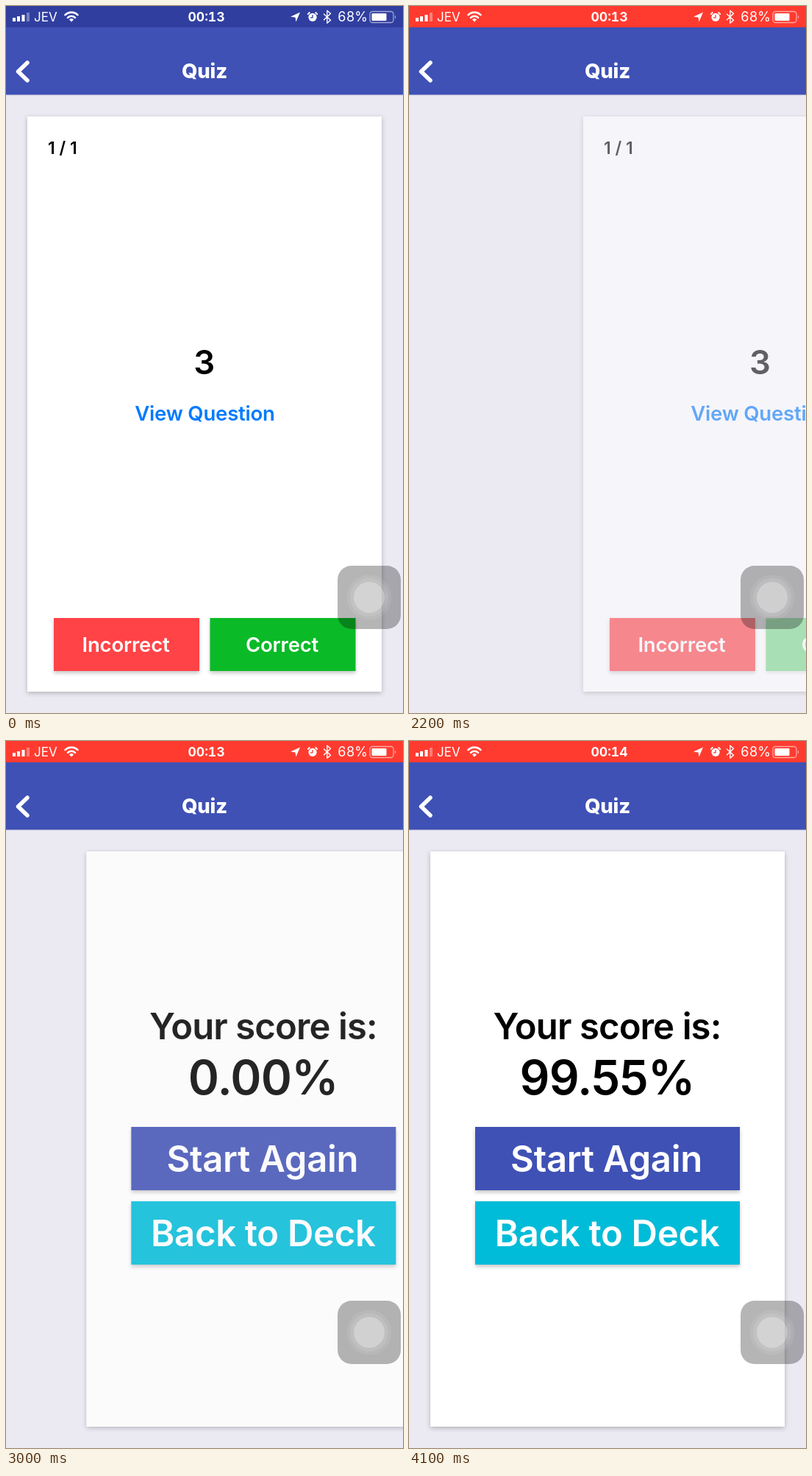
Animation, 540 px wide and 960 px high, one loop 4200 ms. Source, as an HTML page:

```html
<!DOCTYPE html>
<html lang="en">
<head>
<meta charset="utf-8">
<title>Quiz</title>
<style>
  html, body { margin: 0; width: 100%; height: 100%; overflow: hidden; background: #ebe9f2; }
  svg { display: block; }
  text { font: 600 27.5px Inter, Roboto, sans-serif; font-optical-sizing: none; letter-spacing: -.007em; text-anchor: middle; }
  .light { fill: #fff; }
  .start { text-anchor: start; }
  .big text { font-size: 49px; letter-spacing: -.006em; }
  .big .score { font-size: 64px; letter-spacing: -.012em; }
  .status text { font-size: 17.5px; letter-spacing: 0; font-feature-settings: "tnum"; }
  .status .thin { font-weight: 400; text-anchor: start; }
  .card { fill: #fff; filter: drop-shadow(0 2px 3px rgba(0, 0, 0, .24)); }
  .button { filter: drop-shadow(0 3px 2.5px rgba(0, 0, 0, .22)); }
  .line { fill: none; stroke: #fff; stroke-linecap: round; stroke-linejoin: round; }
</style>
</head>
<body>
<svg width="540" height="960" viewBox="0 0 540 960">
  <rect width="540" height="960" fill="#ebe9f2"/>

  <g id="question">
    <rect class="card" x="29" y="150" width="482" height="781"/>
    <text class="start" x="57" y="201" style="font-size:23px;letter-spacing:0">1 / 1</text>
    <text x="269.500" y="500" style="font-size:45.500px">3</text>
    <text x="270.500" y="563" fill="#007aff">View Question</text>
    <rect class="button" x="65" y="831" width="198" height="72" fill="#ff4347"/>
    <text class="light" x="163" y="876.500">Incorrect</text>
    <g id="correct">
      <rect class="button" x="277.500" y="831" width="198" height="72" fill="#0bba27"/>
      <text class="light" x="375.500" y="876.500">Correct</text>
    </g>
  </g>

  <g id="result" class="big">
    <rect class="card" x="29" y="150" width="482" height="781"/>
    <text x="269.500" y="405" style="letter-spacing:-.018em">Your score is:</text>
    <text id="score" class="score" x="269.500" y="480"></text>
    <rect class="button" x="90" y="524" width="360" height="86" fill="#3f51b5"/>
    <text class="light" x="268.500" y="585">Start Again</text>
    <rect class="button" x="90" y="625" width="360" height="86" fill="#00bcd8"/>
    <text class="light" x="269.500" y="686">Back to Deck</text>
  </g>

  <rect y="29" width="540" height="91.500" fill="#3f51b5" style="filter:drop-shadow(0 1px .5px rgba(0,0,0,.08))"/>
  <path class="line" d="M29 77L16.500 89L29 101" stroke-width="5.500"/>
  <text class="light" x="270" y="98" style="font-weight:800">Quiz</text>

  <g class="status light">
    <rect width="540" height="29" fill="#303f9f"/>
    <rect id="alert" width="540" height="29" fill="#ff3b30"/>
    <path d="M9 16h4v5h-4zM15 14h4v7h-4zM21.500 12h4v9h-4z"/>
    <path d="M28 9h4v12h-4z" opacity=".35"/>
    <text class="thin" x="38" y="21" style="font-size:17px">JEV</text>
    <path class="line" d="M80.500 12.200a12 12 0 0 1 17 0M84 15.800a7 7 0 0 1 10 0" stroke-width="2.600"/>
    <path d="M89 21.500l-3-3a4.300 4.300 0 0 1 6 0z"/>
    <text id="clock" x="272.500" y="21" style="font-weight:700"></text>
    <path d="M400 8.500L394.500 21.500L393.500 15.500L387 14.500z"/>
    <circle cx="417" cy="15.300" r="5.600"/>
    <path class="line" d="M410.800 11l2-2M423.200 11l-2-2" stroke-width="1.800"/>
    <path id="hands" d="M417 12v3.800h-3" fill="none" stroke-width="1.300"/>
    <path class="line" d="M432.500 11l9 8.300l-4.700 4v-17l4.700 4l-9 8.500" stroke-width="1.400"/>
    <text class="thin" x="451" y="21" style="font-size:18px">68%</text>
    <rect x="495" y="7.500" width="32" height="15" rx="3.500" fill="none" stroke="#fff" stroke-opacity=".55" stroke-width="1.300"/>
    <rect x="497.500" y="10" width="20" height="10" rx="1.200"/>
    <path d="M529 12.500q2.500 2.500 0 5z" opacity=".6"/>
  </g>

  <rect x="451" y="760" width="86" height="86" rx="19" opacity=".29"/>
  <g class="light">
    <circle cx="494" cy="803" r="30.500" opacity=".08"/>
    <circle cx="494" cy="803" r="26" opacity=".1"/>
    <circle cx="494" cy="803" r="21" opacity=".28"/>
  </g>
</svg>
<script>
const LOOP = 4200, STEP = 100, SLIDE = 450, TRAVEL = 500;
const byId = id => document.getElementById(id);
const [question, result, correct, alertBar, score, clock, hands] =
  ["question", "result", "correct", "alert", "score", "clock", "hands"].map(byId);

const progress = (t, start, length) => Math.min(1, Math.max(0, (t - start) / length));
const inOut = x => x < .5 ? 2 * x * x : 1 - 2 * (1 - x) ** 2;

// Same curve as the CSS "ease" keyword
function ease(x) {
  let lo = 0, hi = 1, s = .5;
  for (let i = 0; i < 24; i++) {
    s = (lo + hi) / 2;
    if (.75 * s * (1 - s) + s ** 3 < x) lo = s; else hi = s;
  }
  return .3 * s * (1 - s) ** 2 + 3 * s * s * (1 - s) + s ** 3;
}

// away: 0 = in place, 1 = slid off to the right and faded out
function slide(card, away) {
  card.setAttribute("transform", `translate(${TRAVEL * away})`);
  card.setAttribute("opacity", 1 - away);
  card.style.display = away > .995 ? "none" : "";
}

function draw() {
  const t = Math.floor(performance.now() % LOOP / STEP) * STEP;
  const red = inOut(progress(t, 0, 700));
  alertBar.setAttribute("opacity", red);
  hands.setAttribute("stroke", red < .5 ? "#303f9f" : "#ff3b30");

  const leave = progress(t, 2086, SLIDE), enter = progress(t, 2757, SLIDE);
  slide(question, leave > 0 ? ease(leave) : 0);
  slide(result, enter < .98 ? 1 - ease(enter) : 0);
  correct.setAttribute("opacity", t < 2100 ? 1 : .2 + .8 * progress(t, 2094, 250));

  score.textContent = (100 * inOut(progress(t, 3623.7, 500))).toFixed(2) + "%";
  clock.textContent = t < 3200 ? "00:13" : "00:14";
  requestAnimationFrame(draw);
}
draw();
</script>
</body>
</html>
```
